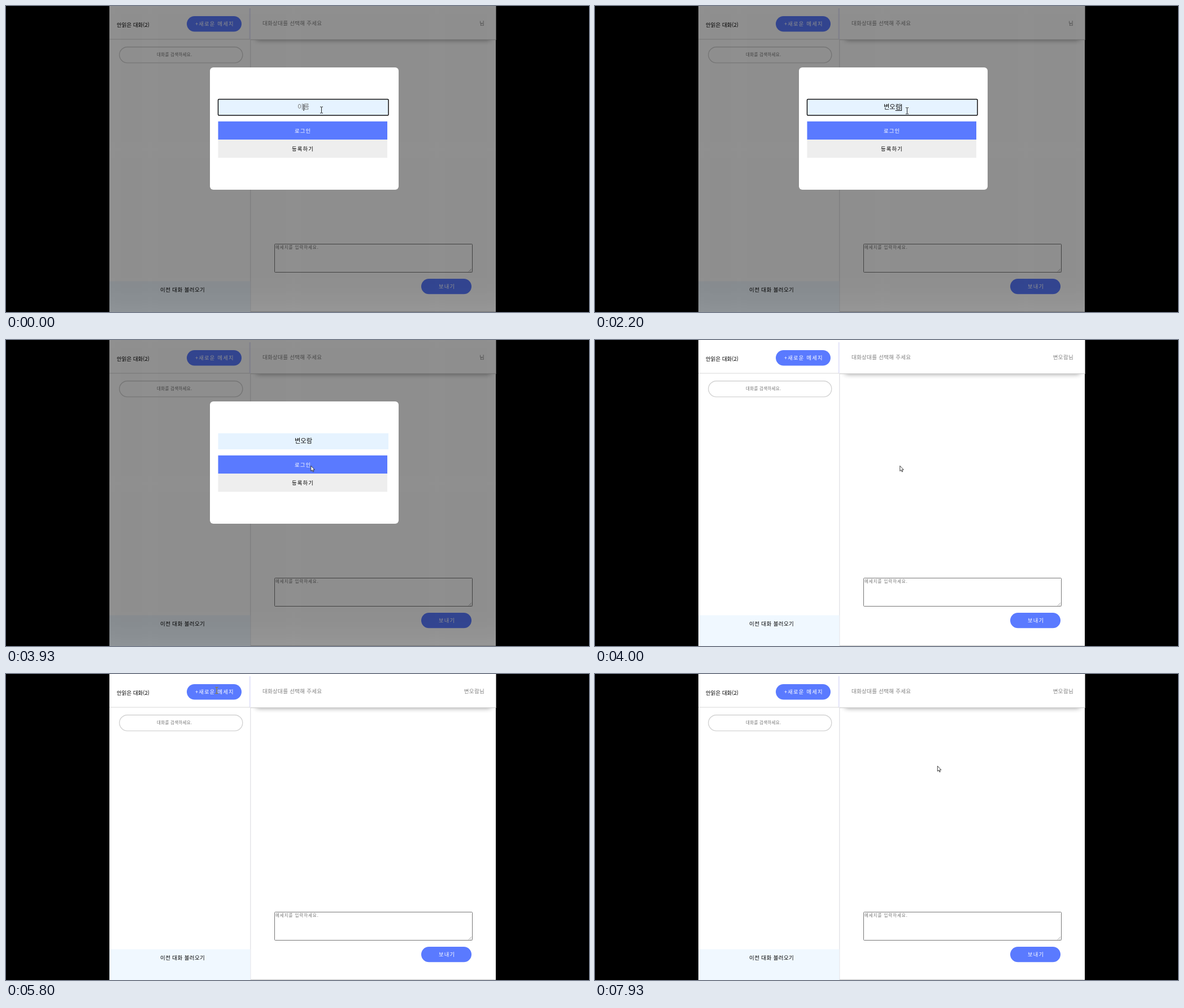
Recreate the animation shown at these times as an HTML page. Size 1032 by 543 pixels, loop 8000 ms.

```html
<!DOCTYPE html>
<html lang="ko">
<head>
<meta charset="utf-8">
<title>대화</title>
<style>
  html, body { margin: 0; width: 100%; height: 100%; overflow: hidden; background: #000; }
  svg { position: absolute; left: 0; top: 0; }
  text { font: 9.5px "Noto Sans CJK KR", "Noto Sans CJK", sans-serif; letter-spacing: .3px; white-space: pre; }
  .wide { font-size: 9.3px; letter-spacing: 1.2px; }
  .white { fill: #fff; }
  .gray { fill: #808080; }
  .hint { fill: #757575; font-size: 7.5px; }
  .mid { text-anchor: middle; }
  .blue { fill: #5a7aff; }
  #veil { position: absolute; left: 183px; top: 0; width: 685px; height: 543px; overflow: hidden; }
  #modal { position: absolute; left: 178px; top: 109px; width: 334px; height: 217px; border-radius: 6px;
    background: #fff; box-shadow: 0 0 120px 300px rgba(0, 0, 0, .443); }
  #value { font-size: 11.3px; letter-spacing: 0; }
</style>
</head>
<body>
<svg width="1032" height="543">
  <defs>
    <filter id="soft" x="-10%" y="-50%" width="120%" height="200%"><feGaussianBlur stdDeviation="5"/></filter>
  </defs>
  <rect x="183" width="684" height="543" fill="#fff"/>

  <rect x="432" y="59" width="1.5" height="484" fill="#e4e4e8"/>
  <rect x="430.5" y="4" width="2.5" height="55" fill="#e8e8fa"/>
  <rect x="183" y="58.5" width="249" height="1.2" fill="#dedede"/>
  <text x="196" y="36.5" style="letter-spacing:0">안읽은 대화(2)</text>
  <rect class="blue" x="320" y="18" width="97" height="27.5" rx="13.75"/>
  <text class="wide white" x="335" y="35">+새로운 메세지</text>
  <rect x="200.8" y="72.7" width="218" height="28.2" rx="14.1" fill="#fff" stroke="#d3d3d3" stroke-width="1.4"/>
  <text class="hint" x="267" y="89.4">대화를 검색하세요.</text>
  <rect x="183" y="488.5" width="249.5" height="54.5" fill="#f0f8ff"/>
  <text x="273" y="507" style="letter-spacing:.4px">이전 대화 불러오기</text>

  <rect x="443" y="20" width="415" height="40" fill="#000" opacity=".45" filter="url(#soft)"/>
  <rect x="433" width="434.5" height="60" fill="#fff"/>
  <rect x="433" y="59.2" width="434.5" height="1.2" fill="#d0d0d0"/>
  <text class="gray" x="454" y="33.7">대화상대를 선택해 주세요</text>
  <text class="gray" id="user" x="847" y="33.7" text-anchor="end"></text>
  <rect x="475.5" y="422.5" width="350" height="50" rx="1" fill="#fff" stroke="#767676"/>
  <path d="M819 471.5l5-5M822.5 471.5l1.5-1.5" stroke="#888" stroke-width=".8"/>
  <text class="hint" x="477" y="431.2" style="letter-spacing:.95px">메세지를 입력하세요.</text>
  <rect class="blue" x="735" y="484" width="89" height="27.3" rx="13.6"/>
  <text class="wide white" x="766" y="500.8">보내기</text>
  <rect x="433" y="541.8" width="434" height="1.2" fill="#d0d0d0"/>
</svg>

<div id="veil"><div id="modal"></div></div>

<svg width="1032" height="543">
  <g id="form">
    <rect x="375.5" y="165.5" width="301.5" height="28.5" fill="#e6f3ff"/>
    <rect id="focus" x="375.5" y="165.5" width="301.5" height="28.5" rx="1.5" fill="none" stroke="#101010" stroke-width="1.5"/>
    <text id="value" class="mid" x="526.5" y="183.4"></text>
    <rect id="underline" y="185" width="10.4" height="1"/>
    <rect id="caret" y="174" width="1" height="12"/>
    <rect class="blue" x="375.5" y="204.8" width="299.5" height="32.4"/>
    <text class="wide white mid" x="525.6" y="224.6">로그인</text>
    <rect x="375.5" y="237.2" width="299.5" height="32.2" fill="#eee"/>
    <text class="wide mid" x="525.6" y="256.8">등록하기</text>
  </g>
  <g id="cursor">
    <path id="beam" d="M-2.5 -5.5H-.7L0 -5L.7 -5.5H2.5M0 -5V5M-2.5 5.5H-.7L0 5L.7 5.5H2.5" fill="none" stroke-width="1"/>
    <path id="arrow" d="M.3 .3V9.6L2.4 7.7L3.9 11L5.3 10.4L3.9 7.2H6.8Z" fill="#fff" stroke="#111" stroke-width=".8"/>
    <path id="hand" d="M-.9 8V1.2Q-.9 .3 0 .3T1 1.2V5Q2.5 4.3 2.8 5.3Q4.2 4.8 4.4 5.8Q5.9 5.5 5.9 7V9.5Q5.9 11.5 4.8 12.3V13.6H-.4V12.5Q-2 10.8 -3.5 8.2Q-3.9 7 -2.8 6.9Q-2 6.9 -.9 8Z" fill="#fff" stroke="#111" stroke-width=".8"/>
  </g>
</svg>

<script>
const $ = id => document.getElementById(id);
const show = (id, on) => { $(id).style.display = on ? '' : 'none'; };

// All times below are ticks of 1/15 s.
const LOOP = 8000, BLUR = 46, LOGIN = 60;
const NAME = '변오람';
const typing = [[0, ''], [11, '벼'], [14, '변ㅇ'], [21, '변오'], [23, '변올'], [25, '변오라'], [27, NAME]];
const caretOn = [[0, true], [1, false], [9, true], [35, false], [43, true]];
// tick, x, y, shape
const path = [
  [0, 558.5, 184.5, 'beam'], [32, 558.5, 184.5, 'beam'], [33, 552.5, 186, 'beam'],
  [35, 546, 198, 'arrow'], [36, 543, 206, 'hand'], [43, 525, 250, 'hand'],
  [50, 525, 250, 'hand'], [56, 539.5, 223, 'hand'], [59, 539.5, 223, 'arrow'],
  [66, 539.5, 223, 'arrow'], [70, 604, 218, 'arrow'],
  [72, 604, 218, 'arrow'], [80, 376, 41, 'arrow'],
  [81, 376, 41, 'arrow'], [82, 375, 36, 'beam'], [83, 374, 32, 'beam'],
  [85, 374, 32, 'beam'], [87, 373, 29, 'beam'],
  [115, 373, 29, 'beam'], [116, 425, 60, 'arrow'], [119, 606, 163, 'arrow'], [120, 606, 163, 'arrow']
];
const lastAt = (table, tick) => table.filter(row => row[0] <= tick).pop();

function drawCursor(tick) {
  const from = lastAt(path, tick);
  const to = path[path.indexOf(from) + 1] || from;
  const part = to === from ? 0 : (tick - from[0]) / (to[0] - from[0]);
  const mix = i => from[i] + (to[i] - from[i]) * part;
  $('cursor').setAttribute('transform', `translate(${mix(1)} ${mix(2)})`);
  for (const shape of ['beam', 'arrow', 'hand']) show(shape, shape === from[3]);
  $('beam').setAttribute('stroke', tick < LOGIN ? '#222' : '#a58500');
}

function drawInput(tick) {
  const text = lastAt(typing, tick)[1];
  const focused = tick < BLUR;
  const right = 526.5 + text.length * 5.2;
  $('value').textContent = text || '이름';
  $('value').setAttribute('fill', text ? '#111' : '#757575');
  $('underline').setAttribute('x', right - 10.4);
  $('caret').setAttribute('x', right);
  show('underline', focused && text);
  show('caret', focused && lastAt(caretOn, tick)[1]);
  show('focus', focused);
}

function draw(ms) {
  const tick = Math.floor(ms * 0.015 + 0.1);
  const open = tick < LOGIN;
  show('veil', open);
  show('form', open);
  $('user').textContent = open ? '님' : NAME + '님';
  drawInput(tick);
  drawCursor(tick);
}

const start = performance.now();
function loop() {
  draw((performance.now() - start) % LOOP);
  requestAnimationFrame(loop);
}
draw(0);
requestAnimationFrame(loop);
</script>
</body>
</html>
```
